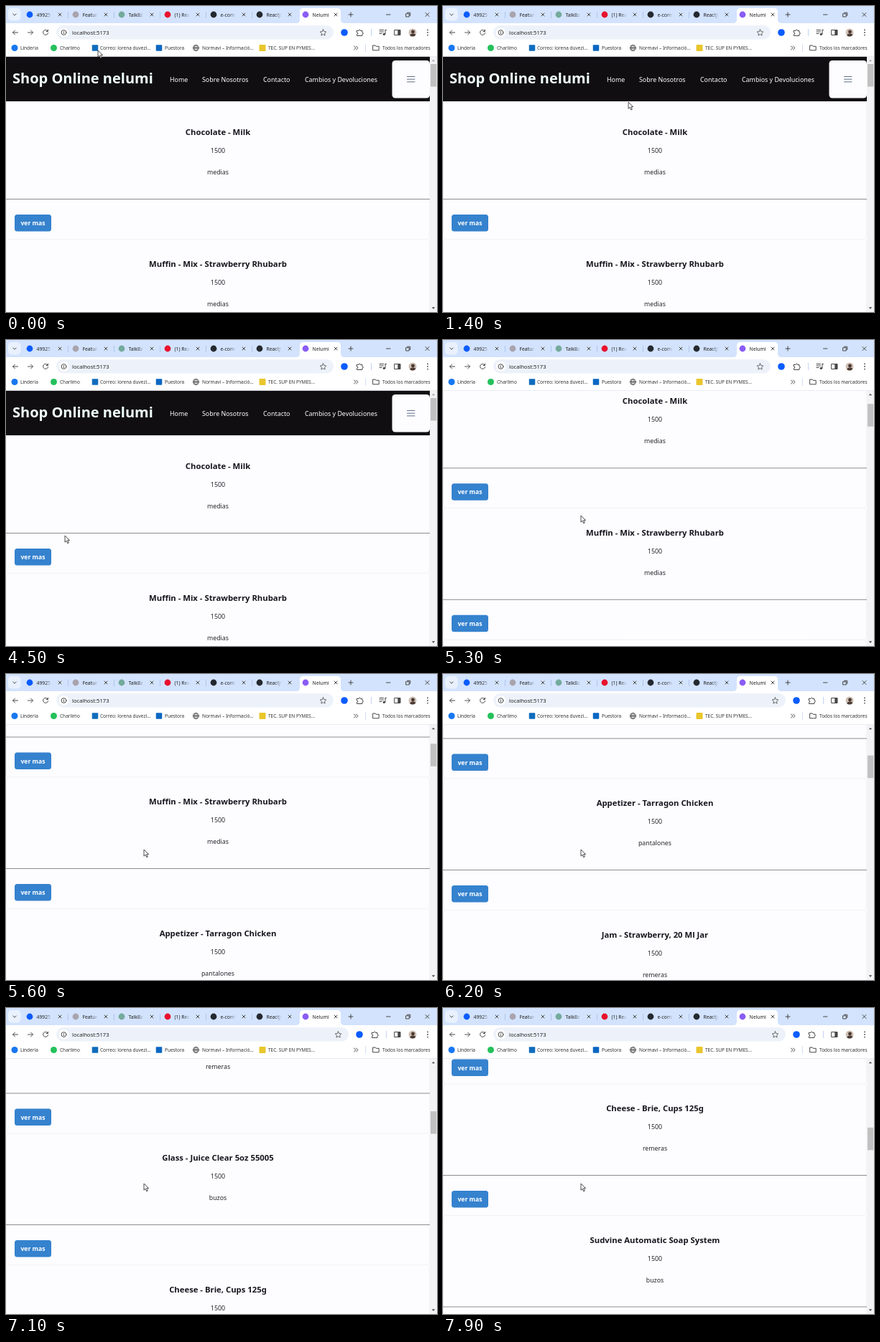
Write an HTML page that moves like this. It is 600x427 px and loops after 8 s.

```html
<!DOCTYPE html>
<html lang="es">
<head>
<meta charset="utf-8">
<style>
  html, body { margin: 0; width: 100%; height: 100%; overflow: hidden; background: #fff; }
  svg { display: block; width: 600px; height: 427px; font-family: "Noto Sans", "Open Sans", sans-serif; }
  .line { fill: none; stroke: #474747; stroke-width: 1; stroke-linecap: round; stroke-linejoin: round; }
</style>
</head>
<body>
<svg id="stage" viewBox="0 0 600 427"></svg>
<script>
const LOOP = 8000, STEP = 100;
const PITCH = 183.5, THUMB_RATIO = 0.09;
const MEDIA_ICON_HIDES = 5900;

const products = [
  ["Chocolate - Milk", "medias"],
  ["Muffin - Mix - Strawberry Rhubarb", "medias"],
  ["Appetizer - Tarragon Chicken", "pantalones"],
  ["Jam - Strawberry, 20 Ml Jar", "remeras"],
  ["Glass - Juice Clear 5oz 55005", "buzos"],
  ["Cheese - Brie, Cups 125g", "remeras"],
  ["Sudvine Automatic Soap System", "buzos"]
];
const tabs = [
  ["49925", "#0b5cff"], ["Feature", "#a9a3ad"], ["TalkBz", "#74aa9c"], ["(1) Rea", "#e8112d"],
  ["e-comi", "#24292f"], ["ReactJs", "#24292f"], ["Nelumi", "#8a5cf6"]
];

// Keyframes: time, then values
const scrollKeys = [[0, 0], [5000, 0], [5600, 181.5], [6200, 363], [7100, 701], [7900, 953.5]];
const cursorKeys = [[0, 128, 62], [200, 128, 62], [2800, 422, 225], [4500, 82, 273], [5100, 192, 245]];

const linear = p => p;
const smooth = p => p * p * (3 - 2 * p);

function sample(keys, time, ease) {
  const next = keys.findIndex(k => k[0] > time);
  if (next < 0) return keys[keys.length - 1].slice(1);
  const a = keys[next - 1], b = keys[next];
  const p = ease((time - a[0]) / (b[0] - a[0]));
  return a.slice(1).map((v, i) => v + (b[i + 1] - v) * p);
}

const text = (x, y, str, size, fill = "#1f1f1f", attrs = "") =>
  `<text x="${x}" y="${y}" font-size="${size}" fill="${fill}" ${attrs}>${str}</text>`;
const rect = (x, y, w, h, fill, r = 0, attrs = "") =>
  `<rect x="${x}" y="${y}" width="${w}" height="${h}" rx="${r}" fill="${fill}" ${attrs}/>`;
const dot = (x, y, r, fill) => `<circle cx="${x}" cy="${y}" r="${r}" fill="${fill}"/>`;
const square = (x, y, size, fill) => rect(x - size / 2, y - size / 2, size, size, fill, 1);
const line = (d, attrs = "") => `<path class="line" d="${d}" ${attrs}/>`;
const cross = (x, y, r) => line(`M${x - r} ${y - r}l${2 * r} ${2 * r}m0 ${-2 * r}l${-2 * r} ${2 * r}`);
const middle = 'text-anchor="middle"';
const bold = 'font-weight="700"';

function card([title, kind], i) {
  const mid = 176 + PITCH * i;
  const top = i ? mid - 34 : 133;
  return rect(0.5, top, 589, mid + 149.5 - top, "#fdfcfe", 4, 'stroke="#f1f0f3" stroke-width=".8"')
    + text(295, mid + 4, title, 11.3, "#16161d", middle + bold)
    + text(295, mid + 29, "1500", 8.9, "#26262c", middle)
    + text(295, mid + 59, kind, 8.8, "#26262c", middle)
    + rect(0, mid + 93, 590, 1, "#8d8d90")
    + rect(12, mid + 115, 51, 23.5, "#3582ce", 3.5)
    + text(37.5, mid + 130, "ver mas", 8.6, "#fff", middle + bold);
}

function siteHeader() {
  const links = [[228, "Home"], [273, "Sobre Nosotros"], [358, "Contacto"], [416, "Cambios y Devoluciones"]];
  return rect(0, 70, 590, 63, "#100e11")
    + text(9, 107.5, "Shop Online nelumi", 20, "#f0fffa", bold)
    + links.map(([x, label]) => text(x, 105.5, label, 8.9, "#fff")).join("")
    + rect(537.5, 76, 52.5, 52.5, "#fdfcfe", 4.5)
    + line("M558.5 98.5h10.5m-10.5 3.7h10.5m-10.5 3.7h10.5", 'style="stroke:#60708a"');
}

function tab([label, color], i) {
  const x = 33 + 64 * i, active = i === 6;
  const bg = active ? "#fff" : "#d3e3fd";
  const fade = active ? "" : rect(x + 22, 5, 9, 15, "url(#fade)") + rect(x + 31, 5, 19, 15, bg);
  const divider = i < 5 ? rect(x + 53, 8, 0.8, 9, "#a8bfe4") : "";
  return dot(x, 12, 4.4, color) + text(x + 9.5, 14.6, label, 6.8) + fade + cross(x + 42, 12, 2) + divider;
}

function bookmarks() {
  const y = 58.5;
  const items = [[20, "Linderia"], [75, "Charlimo"], [131, "Correo: lorena duvezi..."], [221, "Puestora"],
    [273, "Normavi – Informació..."], [365, "TEC. SUP EN PYMES..."], [524, "Todos los marcadores"]];
  return dot(12, y, 4.5, "#1877f2") + dot(66.5, y, 4.5, "#25c15b")
    + square(124, y, 8.5, "#0f6cbd") + square(213, y, 8.5, "#0a66c2") + square(357, y, 9, "#e9c62c")
    + `<circle class="line" cx="264.5" cy="${y}" r="4"/><ellipse class="line" cx="264.5" cy="${y}" rx="1.7" ry="4"/>`
    + line("M260.5 58.5h8")
    + items.map(([x, label]) => text(x, 60.9, label, 6.5, "#333")).join("")
    + line("M484.5 56l2.5 2.5-2.5 2.5m3-5l2.5 2.5-2.5 2.5")
    + rect(500, 53, 0.8, 11, "#c8d8f2")
    + line("M511 55h3l1.2 1.3h4v5.5h-8.2z");
}

function toolbar() {
  return rect(0, 24, 600, 46.5, "#fff")
    + line("M16.5 37h-7m3-3l-3 3 3 3")
    + line("M30.5 37h7m-3-3l3 3-3 3", 'style="stroke:#555"')
    + line("M58 34.8a3.5 3.5 0 1 0 .6 2.8m-.2-4.4v2.3h-2.4")
    + `<rect id="omnibox" x="70" y="27" width="386" height="19.5" rx="9.7" fill="#edf2fa"/>`
    + dot(80.5, 37, 6.8, "#fff")
    + `<circle class="line" cx="80.5" cy="37" r="3.4"/>` + line("M80.5 36.8v1.7m0-3.2v.1")
    + text(92, 39.8, "localhost:5173", 7.6)
    + `<g id="extensions">`
    + line("M441.5 32.8l1.3 2.8 3 .4-2.2 2.1.5 3-2.6-1.5-2.6 1.5.5-3-2.2-2.1 3-.4z", 'style="stroke-width:.8"')
    + dot(471, 37, 4.8, "#0b5cff")
    + line("M488.5 34.5h2.4a1.3 1.3 0 0 1 2.6 0h2.4v2.3a1.3 1.3 0 0 1 0 2.6v2.1h-7.4v-2.1a1.3 1.3 0 0 0 0-2.6z")
    + `</g>`
    + `<g id="media">` + line("M520 33.5h5.5m-5.5 2.5h5.5m-5.5 2.5h3m5-5v6m0-6h1.5")
    + dot(526.3, 39.4, 1.6, "#474747") + `</g>`
    + `<rect id="divider" x="508" y="32" width=".9" height="10" fill="#bcd0f2"/>`
    + line("M541 33.5h8v7h-8z") + rect(545.3, 33.5, 3.7, 7, "#474747")
    + dot(566, 37, 5.5, "#cfc0b4")
    + `<g clip-path="url(#avatar)">` + dot(566.5, 36, 2.4, "#4a3932")
    + `<ellipse cx="566.5" cy="42" rx="4.6" ry="3.6" fill="#4a3932"/></g>`
    + [33.4, 37, 40.6].map(y => dot(587, y, 0.9, "#474747")).join("")
    + bookmarks()
    + rect(0, 70, 600, 0.7, "#e3e6ec");
}

function tabStrip() {
  return rect(0, 0, 600, 24, "#d3e3fd")
    + rect(3, 3, 17.5, 17.5, "#e9f1fe", 5) + line("M9.8 11l2.2 2.2 2.2-2.2")
    + `<path d="M404 24q5 0 5-5V8q0-5 5-5h47q5 0 5 5v11q0 5 5 5z" fill="#fff"/>`
    + tabs.map(tab).join("")
    + line("M477 12h6m-3-3v6")
    + line("M529.5 12h5.5")
    + line("M557 10.8h4.2v4.2h-4.2zm1.5-1.5h4.2v4.2")
    + cross(586.5, 12, 2.5);
}

function scrollbar() {
  return rect(590, 70.5, 10, 356.5, "#f3f2f4")
    + `<path id="up" d="M592.8 77.3l2.2-2.6 2.2 2.6z"/>`
    + `<path d="M592.8 420.3l2.2 2.6 2.2-2.6z" fill="#505050"/>`
    + `<rect id="thumb" x="591" y="81" width="8.2" height="31.5" fill="#c1c1c1"/>`;
}

document.getElementById("stage").innerHTML = `
  <defs>
    <linearGradient id="fade"><stop stop-color="#d3e3fd" stop-opacity="0"/><stop offset="1" stop-color="#d3e3fd"/></linearGradient>
    <clipPath id="avatar"><circle cx="566" cy="37" r="5.5"/></clipPath>
  </defs>
  ${rect(0, 0, 600, 427, "#fff")}
  <g id="page">${products.map(card).join("")}${siteHeader()}</g>
  ${scrollbar()}${tabStrip()}${toolbar()}
  <path id="cursor" d="M0 0v9.2l2.1-2 1.6 3.6 1.6-.7-1.6-3.5h2.9z" fill="#fff" stroke="#222" stroke-width=".8" stroke-linejoin="round"/>`;

const el = id => document.getElementById(id);
const page = el("page"), thumb = el("thumb"), up = el("up"), cursor = el("cursor");
const omnibox = el("omnibox"), extensions = el("extensions"), media = el("media"), divider = el("divider");

function draw(time) {
  const [scroll] = sample(scrollKeys, time, linear);
  const [x, y] = sample(cursorKeys, time, smooth);
  const mediaShown = time < MEDIA_ICON_HIDES;
  const shift = mediaShown ? 0 : 21;
  page.setAttribute("transform", `translate(0 ${-scroll})`);
  thumb.setAttribute("y", 81 + scroll * THUMB_RATIO);
  up.setAttribute("fill", scroll ? "#505050" : "#a3a3a3");
  cursor.setAttribute("transform", `translate(${x} ${y})`);
  media.setAttribute("visibility", mediaShown ? "visible" : "hidden");
  extensions.setAttribute("transform", `translate(${shift} 0)`);
  divider.setAttribute("x", 508 + shift);
  omnibox.setAttribute("width", 386 + shift);
}

const start = performance.now();
function tick() {
  const time = (performance.now() - start) % LOOP;
  draw(Math.floor(time / STEP) * STEP);
  requestAnimationFrame(tick);
}
tick();
</script>
</body>
</html>
```
